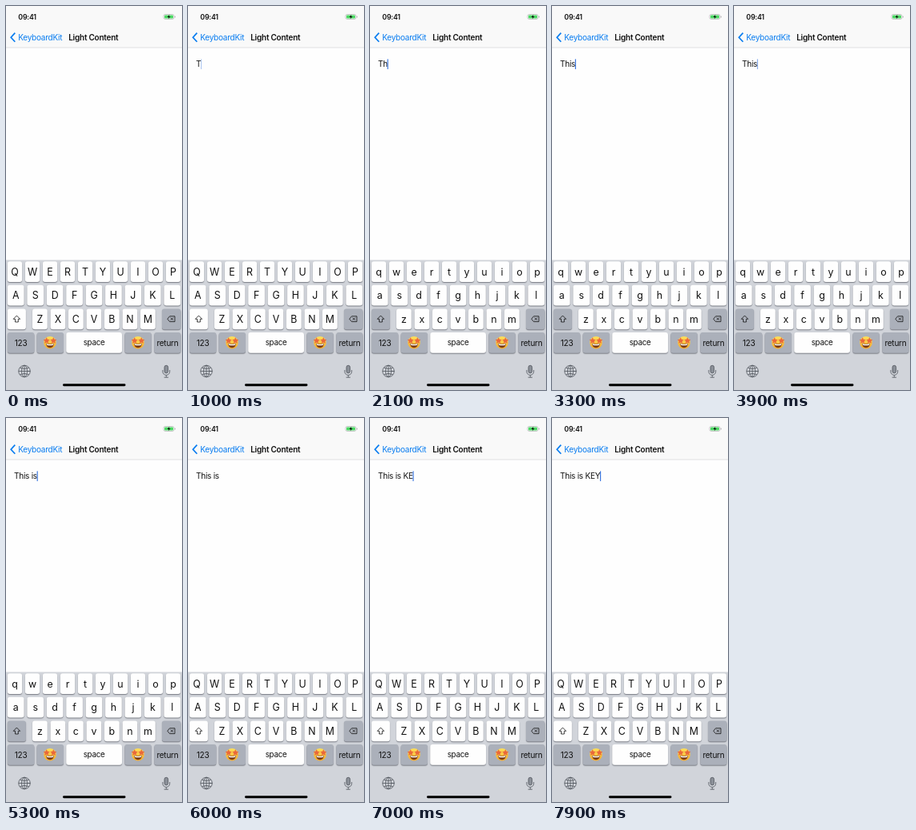
Recreate the animation shown at these times as an HTML page with a canvas. Size 220x480 px, loop 8000 ms.

```html
<!DOCTYPE html>
<html lang="en">
<head>
<meta charset="utf-8">
<title>Keyboard typing</title>
<style>
  html, body { margin: 0; width: 100%; height: 100%; overflow: hidden; background: #fff; }
  canvas { display: block; width: 220px; height: 480px; }
</style>
</head>
<body>
<canvas id="stage"></canvas>
<script>
const LOOP = 8000;
const canvas = document.getElementById('stage');
const ctx = canvas.getContext('2d');
const scale = window.devicePixelRatio || 1;
canvas.width = 220 * scale;
canvas.height = 480 * scale;

const INK = '#111', BLUE = '#087cf0', LIGHT = '#fefefe', DARK = '#abb0ba';
const typed = [[1000, 'T'], [1900, 'h'], [2500, 'i'], [3200, 's'], [4100, ' '], [4700, 'i'],
               [5200, 's'], [5700, ' '], [6600, 'K'], [7000, 'E'], [7500, 'Y']];
// Cursor opacity over time: [ms, opacity]
const blink = [[0, 0], [200, 0], [500, 1], [900, 1], [1000, .4], [1150, 0], [1400, 0], [1700, 1],
               [2250, 1], [2500, 0], [2800, 0], [3100, 1], [3350, 1], [3550, 0], [3750, 0], [4000, 1],
               [4100, 1], [4400, 0], [4650, 0], [4700, .6], [4900, 1], [5650, 1], [5900, 0],
               [6150, 0], [6450, 1], [LOOP, 1]];

function cursorOpacity(t) {
  const i = blink.findIndex(([time]) => time > t);
  const [t0, a] = blink[i - 1], [t1, b] = blink[i];
  return a + (b - a) * (t - t0) / (t1 - t0);
}

function text(str, x, y, size, { color = INK, weight = 400, align = 'left', spacing = -.24 } = {}) {
  ctx.font = `${weight} ${size}px Inter, sans-serif`;
  ctx.letterSpacing = spacing + 'px';
  ctx.textAlign = align;
  ctx.fillStyle = color;
  ctx.fillText(str, x, y);
  return ctx.measureText(str).width;
}

function box(x, y, w, h, r, color) {
  ctx.fillStyle = color;
  ctx.beginPath();
  ctx.roundRect(x, y, w, h, r);
  ctx.fill();
}

function line(path, color = INK, width = 1) {
  ctx.strokeStyle = color;
  ctx.lineWidth = width;
  ctx.stroke(new Path2D(path));
}

function fill(path, color) {
  ctx.fillStyle = color;
  ctx.fill(new Path2D(path));
}

function key(x, y, w, color = LIGHT, label = '', size = 12.4) {
  ctx.save();
  ctx.shadowColor = 'rgba(60,64,74,.6)';
  ctx.shadowOffsetY = scale;
  ctx.shadowBlur = 1.2 * scale;
  box(x, y, w, 25.8, 3, color);
  ctx.restore();
  text(label, x + w / 2, y + 13 + size * .35, size, { align: 'center', spacing: size > 11 ? 0 : -.24 });
}

function letters(row, x, y, w, pitch) {
  [...row].forEach((c, i) => key(x + i * pitch, y, w, LIGHT, c));
}

function star(x, y, r) {
  ctx.beginPath();
  for (let i = 0; i < 10; i++) {
    const a = i * Math.PI / 5 - Math.PI / 2, d = i % 2 ? r * .5 : r;
    ctx.lineTo(x + d * Math.cos(a), y + d * Math.sin(a));
  }
  ctx.fillStyle = '#e9683b';
  ctx.fill();
}

function starStruck(x, y) {
  const face = ctx.createLinearGradient(0, y - 8, 0, y + 8);
  face.addColorStop(0, '#ffe15a');
  face.addColorStop(1, '#f3a82c');
  box(x - 7.8, y - 7.8, 15.6, 15.6, 7.8, face);
  ctx.save();
  ctx.translate(x, y);
  fill('M-5 1Q0 2.6 5 1Q4.6 6.4 0 6.4Q-4.6 6.4-5 1Z', '#7a3b16');
  fill('M-4.5 1.5Q0 2.8 4.5 1.5L4.1 3Q0 4-4.1 3Z', '#fff');
  ctx.restore();
  star(x - 4.3, y - 2.4, 4.2);
  star(x + 4.3, y - 2.4, 4.2);
}

function header() {
  box(0, 0, 220, 52, 0, '#f9f9f9');
  box(0, 51.7, 220, .6, 0, '#c4c4c6');
  text('09:41', 15.3, 17, 8.8, { weight: 600, spacing: -.2 });
  line('M199 10.5H208Q210 10.5 210 12.5V14.5Q210 16.5 208 16.5H199Q197 16.5 197 14.5V12.5Q197 10.5 199 10.5Z', '#a5a8a6', .6);
  box(198, 11.4, 11, 4.2, 1, '#4cd964');
  box(210.7, 12.5, 1, 2, .5, '#a5a8a6');
  fill('M204.4 10.8L201.5 14H203.4L202.7 16.3L205.7 13H203.8Z', INK);
  line('M11.3 33.6L6.2 39.2L11.3 44.8', BLUE, 1.7);
  text('KeyboardKit', 15.2, 42.8, 10, { color: BLUE });
  text('Light Content', 78.2, 42.8, 10, { weight: 600 });
}

function keyboard(upper) {
  const cased = row => upper ? row.toUpperCase() : row;
  box(0, 317.5, 220, 162.5, 0, '#d1d4da');
  letters(cased('qwertyuiop'), 1.9, 319.2, 18.2, 22);
  letters(cased('asdfghjkl'), 1.9, 348.8, 20.7, 24.44);
  letters(cased('zxcvbnm'), 33, 378.4, 18.8, 22.5);

  key(1.9, 378.4, 23, upper ? LIGHT : DARK);
  line('M13.4 387L17.6 391.3H15.3V395H11.5V391.3H9.2Z', INK, .8);
  key(195, 378.4, 23.4, DARK);
  line('M204.6 387.8H211V394.6H204.6L201.8 391.2ZM205.8 389.6L209 392.8M209 389.6L205.8 392.8', INK, .8);

  key(1.9, 408, 33.4, DARK, '123', 10);
  key(38.6, 408, 33.4, DARK);
  key(75.2, 408, 69.8, LIGHT, 'space', 9.8);
  key(148.4, 408, 33.4, DARK);
  key(185.4, 408, 33, DARK, 'return', 10);
  starStruck(55, 420.8);
  starStruck(165, 420.8);

  ctx.beginPath();
  ctx.arc(23, 456.5, 7.3, 0, 7);
  ctx.ellipse(23, 456.5, 3.5, 7.3, 0, 0, 7);
  ctx.strokeStyle = '#50555c';
  ctx.lineWidth = .8;
  ctx.stroke();
  line('M23 449.2V463.8M15.7 456.5H30.3M17.3 452.3Q23 454.8 28.7 452.3M17.3 460.7Q23 458.2 28.7 460.7', '#50555c', .8);
  box(198, 449.3, 4.6, 9.6, 2.3, '#8b9098');
  line('M198 451.6A2.3 2.3 0 0 1 202.6 451.6V456.6A2.3 2.3 0 0 1 198 456.6ZM195.9 455V457A4.4 4.4 0 0 0 204.7 457V455M200.3 461.4V464.2M197.6 464.2H203', '#50555c', .8);
  box(71, 472.3, 78.5, 2.9, 1.45, '#000');
}

function draw(t) {
  ctx.setTransform(scale, 0, 0, scale, 0, 0);
  box(0, 0, 220, 480, 0, '#fefefe');
  header();
  const content = typed.filter(([time]) => time <= t).map(([, c]) => c).join('');
  const width = text(content, 10, 76, 10);
  ctx.globalAlpha = cursorOpacity(t);
  box(10 + width - .3, 66.2, 1.2, 12.8, .6, '#3d78e0');
  ctx.globalAlpha = 1;
  keyboard(t < 1100 || t >= 5900);
}

function frame() {
  draw(performance.now() % LOOP);
  requestAnimationFrame(frame);
}
frame();
</script>
</body>
</html>
```
